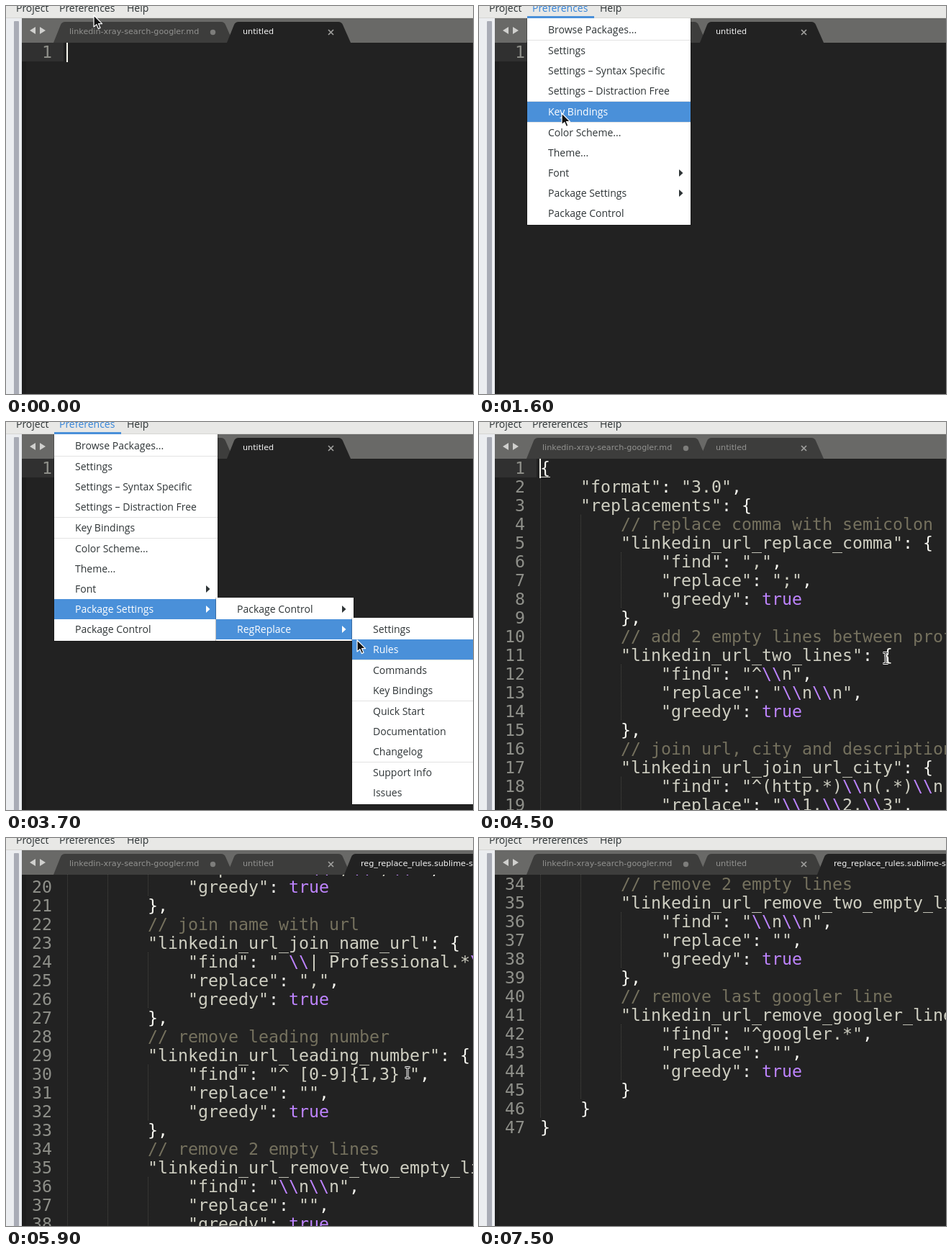
An HTML page for the animation above (7600 ms loop, 649 by 539 pixels).

```html
<!DOCTYPE html>
<html lang="en">
<head>
<meta charset="utf-8">
<title>Editor package settings</title>
<style>
  html, body { margin: 0; width: 100%; height: 100%; overflow: hidden; background: #222; }
  svg { display: block; }
  text { white-space: pre; }
  .ui { font: 14px "Open Sans", "Noto Sans", sans-serif; fill: #2e3436; }
  .tab { font: 11.2px "DejaVu Sans", sans-serif; fill: #929290; }
  .code { font: 23.25px "DejaVu Sans Mono", monospace; fill: #f8f8f2; }
  .num { fill: #8f908a; text-anchor: end; }
  .str { fill: #cfcfc2; }
  .note { fill: #75715e; }
  .const { fill: #be84ff; }
  .guide { stroke: #484844; stroke-dasharray: 1 1; }
  .shape { fill: #3d3d3c; }
  .active .shape { fill: #222; }
  .active .tab { fill: #f4f4f4; }
  .panel { fill: #fff; }
  .sep { fill: #e3e3e3; }
  .bar, .mark { fill: none; }
  .on .bar { fill: #4a90d9; }
  .on .ui, .on .arrow { fill: #fff; }
  .arrow { fill: #2e3436; }
  .open .ui { fill: #3584d8; }
  .line { fill: none; }
  .open .line { fill: #4a90d9; }
</style>
</head>
<body>
<svg id="stage" width="649" height="539" viewBox="0 0 649 539">
  <rect width="649" height="539" fill="#222"/>
  <svg y="51" width="649" height="488">
    <rect x="22" width="6" height="488" fill="#1e1e1e"/>
    <g id="doc">
      <rect x="22" width="58" height="26" fill="#303030"/>
      <text class="code num" x="64" y="21">1</text>
      <g id="file"></g>
      <rect x="84" width="2" height="27" fill="#f8f8f0"/>
    </g>
  </svg>

  <rect x="22" y="17" width="627" height="34" fill="#696967"/>
  <path d="M33 34l8-5v10zM55 34l-8-5v10z" fill="#d0d0ce"/>
  <g>
    <path class="shape" d="M66 51L76 26Q78 22 82 22H299Q303 22 305 26L316 51z"/>
    <text class="tab" x="88" y="39">linkedin-xray-search-googler.md</text>
    <circle cx="287.500" cy="36.500" r="3.700" fill="#7d7d7b"/>
  </g>
  <g id="untitled">
    <path class="shape" d="M307 51L317 26Q319 22 323 22H462Q466 22 468 26L479 51z"/>
    <text class="tab" x="329" y="39">untitled</text>
    <path d="M448 33l7 7m0-7l-7 7" stroke="#a0a09e" stroke-width="1.700"/>
  </g>
  <svg id="rules" x="470" y="17" width="179" height="34">
    <g class="active">
      <path class="shape" d="M0 34L10 9Q12 5 16 5H190V34z"/>
      <text class="tab" x="23" y="22">reg_replace_rules.sublime-settings</text>
    </g>
  </svg>

  <rect y="17" width="22" height="522" fill="#ebedf0"/>
  <path d="M11 539V22q0-1 1-1h5q1 0 1 1V539z" fill="#a9acb6"/>
  <rect width="649" height="17" fill="#e8e8e6"/>
  <rect y="16" width="649" height="1" fill="#d6d6d3"/>
  <text class="ui" x="14" y="8">Project</text>
  <g id="prefs">
    <rect class="line" x="67" y="14" width="93" height="3"/>
    <text class="ui" x="74" y="8">Preferences</text>
  </g>
  <text class="ui" x="168" y="8">Help</text>

  <g id="menus"></g>

  <path id="hand" d="M0 0V16L3.800 12.600L6.300 18.600L9 17.400L6.500 11.600H11.600z"
    fill="#111" stroke="#fff" stroke-width="1.200" stroke-linejoin="round"/>
  <g id="beam" fill="none">
    <path d="M-3.500-7.500h7M0-7.500v15M-3.500 7.500h7" stroke="#fff" stroke-width="3"/>
    <path d="M-3-7.500h6M0-7.500v15M-3 7.500h6" stroke="#111"/>
  </g>
</svg>
<script>
const LOOP = 7600, STEP = 100, ROW = 26, COL = 14, LEFT = 85;
const $ = id => document.getElementById(id);

function add(parent, tag, attrs = {}, text) {
  const el = document.createElementNS("http://www.w3.org/2000/svg", tag);
  for (const k in attrs) el.setAttribute(k, attrs[k]);
  if (text !== undefined) el.textContent = text;
  parent.append(el);
  return el;
}

// The settings file: comment, rule name, find, replace
const rules = [
  ["replace comma with semicolon", "replace_comma", ",", ";"],
  ["add 2 empty lines between profiles", "two_lines", String.raw`^\\n`, String.raw`\\n\\n`],
  ["join url, city and description", "join_url_city", String.raw`^(http.*)\\n(.*)\\n(.*)`, String.raw`\\1,\\2,\\3`],
  ["join name with url", "join_name_url", String.raw` \\| Professional.*\\n`, ","],
  ["remove leading number", "leading_number", "^ [0-9]{1,3} ", ""],
  ["remove 2 empty lines", "remove_two_empty_lines", String.raw`\\n\\n`, ""],
  ["remove last googler line", "remove_googler_line", "^googler.*", ""]
];
const lines = [[0, "{"], [4, '"format": "3.0",'], [4, '"replacements": {']];
rules.forEach(([note, name, find, swap], i) => lines.push(
  [8, `// ${note}`],
  [8, `"linkedin_url_${name}": {`],
  [12, `"find": "${find}",`],
  [12, `"replace": "${swap}",`],
  [12, '"greedy": true'],
  [8, i < rules.length - 1 ? "}," : "}"]
));
lines.push([4, "}"], [0, "}"]);

function kind(part) {
  if (part.startsWith("//")) return "note";
  if (part === "true") return "const";
  return part[0] === '"' ? "str" : "";
}

lines.forEach(([indent, text], i) => {
  const y = i * ROW;
  for (let c = 0; c < indent; c += 4) {
    const x = LEFT + c * COL + 0.5;
    add($("file"), "path", { class: "guide", d: `M${x} ${y}v${ROW}` });
  }
  if (i) add($("file"), "text", { class: "code num", x: 64, y: y + 21 }, i + 1);
  const row = add($("file"), "text", { class: "code", x: LEFT + indent * COL, y: y + 21 });
  for (const part of text.split(/(\/\/.*$|"[^"]*"|true)/).filter(Boolean)) {
    for (const bit of part.split(/(\\\\)/).filter(Boolean)) {
      add(row, "tspan", { class: bit === "\\\\" ? "const" : kind(part) }, bit);
    }
  }
});
const underline = row => add($("file"), "rect",
  { x: LEFT + 1, y: row * ROW + 25, width: 13, height: 1, fill: "#d8d8d0" });
underline(0);
const endMark = underline(lines.length - 1);

// Menus: "-" is a separator, a trailing ">" opens a submenu
function menu(x, y, width, labels) {
  const g = add($("menus"), "g");
  const height = labels.reduce((h, s) => h + (s === "-" ? 1 : 28), 4);
  add(g, "rect", { x: x - 1, y, width: width + 2, height: height + 1, fill: "#000", opacity: 0.25 });
  add(g, "rect", { class: "panel", x, y, width, height });
  const items = [];
  let top = y + 2;
  for (const label of labels) {
    if (label === "-") {
      add(g, "rect", { class: "sep", x, y: top, width, height: 1 });
      top += 1;
      continue;
    }
    const el = add(g, "g");
    add(el, "rect", { class: "bar", x, y: top, width, height: 28 });
    add(el, "text", { class: "ui", x: x + 29, y: top + 19 }, label.replace(">", ""));
    if (label.endsWith(">")) {
      add(el, "path", { class: "arrow", d: `M${x + width - 16} ${top + 9}l5.500 5l-5.500 5z` });
    }
    items.push({ el, top });
    top += 28;
  }
  return { g, x, items };
}

const main = menu(67, 17, 227, ["Browse Packages...", "-", "Settings",
  "Settings – Syntax Specific", "Settings – Distraction Free", "-", "Key Bindings", "-",
  "Color Scheme...", "Theme...", "Font>", "Package Settings>", "Package Control"]);
const sub = menu(292, 244, 191, ["Package Control>", "RegReplace>"]);
const last = menu(481, 272, 190, ["Settings", "Rules", "-", "Commands", "Key Bindings", "-",
  "Quick Start", "Documentation", "Changelog", "-", "Support Info", "Issues"]);

function show(el, on) {
  el.style.display = on ? "" : "none";
}

function pick(m, y) {
  for (const { el, top } of m.items) el.classList.toggle("on", y >= top && y < top + 28);
}

// Linear interpolation through [time, ...values]
function at(keys, t) {
  const i = keys.findIndex(k => k[0] > t);
  if (i < 0) return keys[keys.length - 1].slice(1);
  const a = keys[i - 1], b = keys[i], u = (t - a[0]) / (b[0] - a[0]);
  return a.slice(1).map((v, j) => v + (b[j + 1] - v) * u);
}

const pointer = [
  [0, 122, 13], [600, 120, 7], [1100, 120, 7], [1600, 115, 149], [1900, 153, 263],
  [2100, 152, 262], [2300, 152, 262], [2700, 298, 279], [3100, 369, 287],
  [3200, 369, 287], [3300, 411, 289], [3400, 411, 289], [4000, 565, 317],
  [4400, 565, 317], [4500, 565, 328], [4900, 565, 328], [5400, 558, 326],
  [6100, 558, 326], [6400, 553, 320], [6800, 553, 320], [7200, 377, 3]
];
const scroll = [
  [0, 0], [4900, 0], [5100, 78], [5200, 78], [5400, 156], [5500, 156], [5600, 196],
  [5900, 490], [6000, 546], [6100, 546], [6300, 672], [6400, 702], [6500, 702],
  [6800, 846], [6900, 858]
];

function render(t) {
  const [x, y] = at(pointer, t);
  const opened = t >= 4500;
  const menuOpen = t >= 400 && !opened;
  const subOpen = t >= 2000 && !opened;
  const lastOpen = t >= 3000 && !opened;

  $("prefs").classList.toggle("open", menuOpen);
  show(main.g, menuOpen);
  show(sub.g, subOpen);
  show(last.g, lastOpen);
  pick(main, subOpen ? 260 : y);
  pick(sub, lastOpen ? 288 : x >= sub.x ? y : -1);
  pick(last, x >= last.x ? y : -1);

  show($("file"), opened);
  show(endMark, t < 7400);
  $("untitled").setAttribute("class", opened ? "" : "active");
  show($("rules"), t >= 4700);
  $("rules").setAttribute("width", Math.min(179, Math.max(0, (t - 4600) * 0.6)));
  $("doc").setAttribute("transform", `translate(0 ${-Math.round(at(scroll, t)[0])})`);

  const beam = opened && y > 51;
  const place = `translate(${Math.round(x)} ${Math.round(y)})`;
  show($("beam"), beam);
  show($("hand"), !beam && t < 7400);
  $("beam").setAttribute("transform", place);
  $("hand").setAttribute("transform", place);
}

let start;
function tick(now) {
  start ??= now;
  render(Math.floor(((now - start) % LOOP + 0.5) / STEP) * STEP % LOOP);
  requestAnimationFrame(tick);
}
render(0);
requestAnimationFrame(tick);
</script>
</body>
</html>
```
